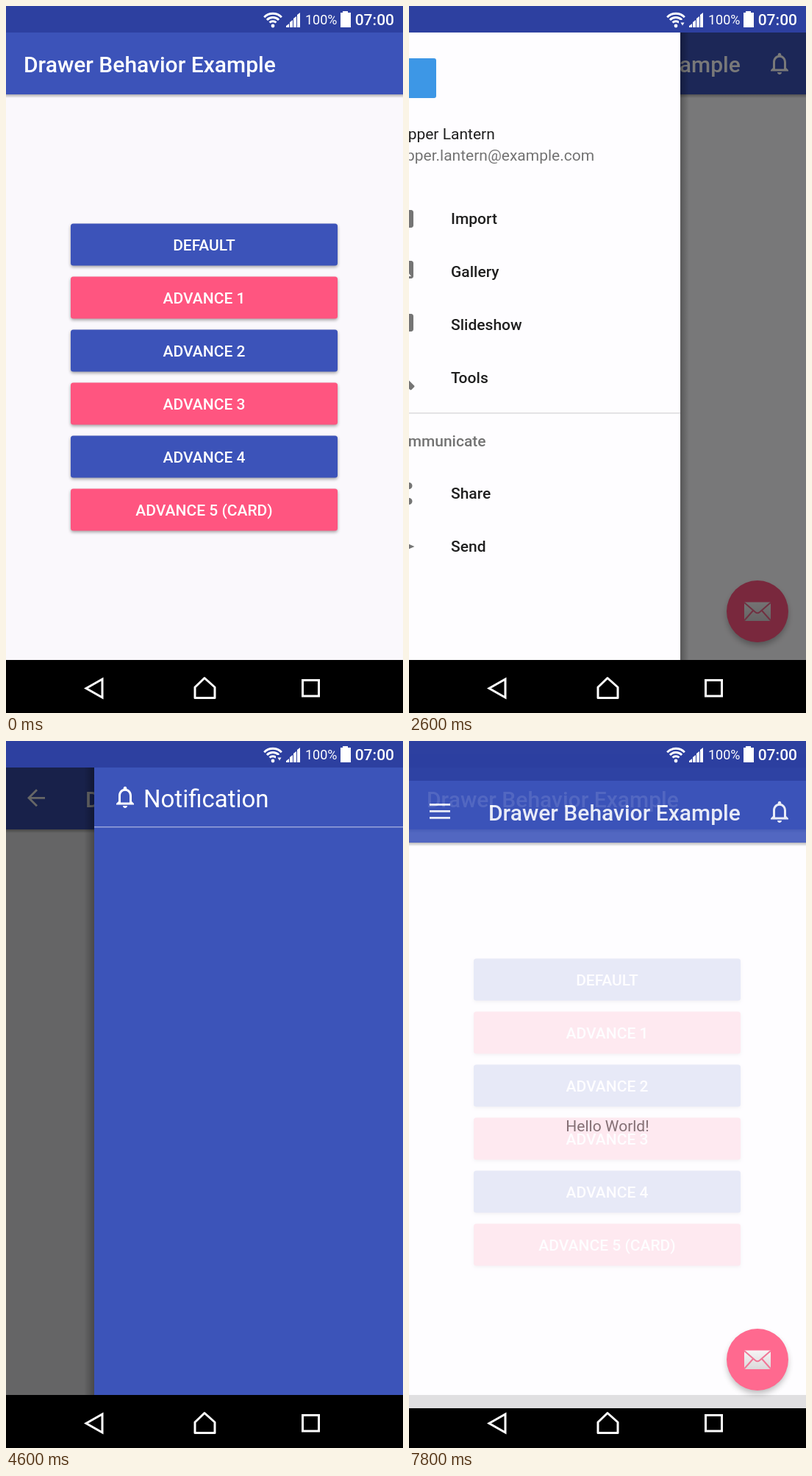
Recreate the animation shown at these times as an HTML page. Size 540x960 px, loop 8 s.

```html
<!DOCTYPE html>
<html lang="en">
<head>
<meta charset="utf-8">
<title>Drawer Behavior Example</title>
<style>
  html, body { margin: 0; width: 100%; height: 100%; overflow: hidden; background: #000; }
  svg { display: block; width: 100vw; height: 100vh; font-family: Roboto, "Noto Sans", sans-serif; font-size: 21px; }
  .medium { font-weight: 500; }
  .title { font-size: 30px; font-weight: 500; fill: #fff; }
  .mid { text-anchor: middle; }
  .gray { fill: #737373; }
  .line { fill: none; stroke: #fff; stroke-width: 3; }
</style>
</head>
<body>
<svg viewBox="0 0 540 960" xmlns="http://www.w3.org/2000/svg">
  <defs>
    <linearGradient id="under" x2="0" y2="1">
      <stop offset="0" stop-opacity=".3"/><stop offset="1" stop-opacity="0"/>
    </linearGradient>
    <linearGradient id="edge">
      <stop offset="0" stop-opacity=".28"/><stop offset="1" stop-opacity="0"/>
    </linearGradient>
    <linearGradient id="paper" x2="0" y2="1">
      <stop offset="0" stop-color="#f6f4f5"/><stop offset="1" stop-color="#d6d4d5"/>
    </linearGradient>
    <filter id="blur" x="-20%" y="-40%" width="140%" height="180%"><feGaussianBlur stdDeviation="2"/></filter>
    <filter id="soft" x="-30%" y="-40%" width="160%" height="180%"><feGaussianBlur stdDeviation="4"/></filter>
    <path id="bell" transform="scale(1.5)" fill="#fff" d="M12 22c1.1 0 2-.9 2-2h-4c0 1.1.9 2 2 2zm6-6v-5c0-3.07-1.63-5.64-4.5-6.32V4c0-.83-.67-1.5-1.5-1.5s-1.5.67-1.5 1.5v.68C7.64 5.36 6 7.92 6 11v5l-2 2v1h16v-1l-2-2zm-2 1H8v-6c0-2.48 1.51-4.5 4-4.5s4 2.02 4 4.5v6z"/>
    <g id="bars">
      <rect y="120" width="540" height="5" fill="url(#under)"/>
      <rect width="540" height="37" fill="#2d40a0"/>
      <rect y="36" width="540" height="84" fill="#3c53b9"/>
      <rect y="888" width="540" height="72"/>
    </g>
  </defs>

  <g id="menu">
    <rect width="540" height="960" fill="#faf8fc"/>
    <use href="#bars"/>
    <text class="title" x="24" y="90">Drawer Behavior Example</text>
    <g id="buttons"></g>
  </g>

  <g id="page">
    <rect width="540" height="960" fill="#fefdff"/>
    <use href="#bars"/>
    <path id="toggle" class="line" style="stroke-width:2.8"/>
    <text class="title" x="108" y="90">Drawer Behavior Example</text>
    <use href="#bell" x="0" y="0" transform="translate(486 60)"/>
    <text class="mid gray" x="270" y="512">Hello World!</text>
    <circle cx="474" cy="827" r="41" opacity=".3" filter="url(#soft)"/>
    <circle cx="474" cy="822" r="42" fill="#ff5580"/>
    <rect x="456" y="809.5" width="36" height="25.5" rx="1" fill="url(#paper)"/>
    <path d="M456 810L471 823Q474 825.5 477 823L492 810M456 834.5L468 821M492 834.5L480 821" fill="none" stroke="#f0658a" stroke-width="2"/>
    <rect id="scrim" y="36" width="540" height="852"/>

    <g id="left">
      <rect x="420" y="36" width="12" height="852" fill="url(#edge)"/>
      <rect y="36" width="420" height="852" fill="#fefdff"/>
      <rect x="34" y="71" width="54" height="54" rx="3" fill="#3d97e6"/>
      <text x="24" y="181" fill="#1f1f1f">Copper Lantern</text>
      <text x="24" y="210" class="gray">copper.lantern@example.com</text>
      <g id="items"></g>
      <rect y="552" width="420" height="1.5" fill="#dcdbdd"/>
      <text x="24" y="598" class="medium gray">Communicate</text>
    </g>

    <g id="right">
      <rect x="-14" y="36" width="14" height="852" fill="url(#edge)" transform="matrix(-1 0 0 1 -14 0)"/>
      <rect y="36" width="420" height="852" fill="#3c54b9"/>
      <use href="#bell" transform="translate(24 58)"/>
      <text x="67" y="90" font-size="33" fill="#fff">Notification</text>
      <rect y="116" width="420" height="1.5" fill="#98a4da"/>
    </g>
    <rect y="888" width="540" height="72"/>
  </g>

  <g id="system" fill="#fff">
    <g class="line" id="wifi"></g>
    <circle cx="363" cy="27" r="2.4"/>
    <path id="traffic" d="M367 19h8v10h-8z" fill="#2d40a0"/>
    <path id="arrow" d="M369.5 22.5h5l-2.5 4z"/>
    <g id="signal"></g>
    <text x="407" y="25" font-size="18">100%</text>
    <path d="M458 7h7v2h4v20h-14V9h3z"/>
    <text class="medium" x="528" y="26" text-anchor="end">07:00</text>
    <rect id="ripple" x="41" y="888" width="158" height="72" rx="36" fill="#2a2a2c"/>
    <g class="line">
      <path d="M109 926.5L131 914V939z"/>
      <path d="M270 912.5L284 925V939.5H257V925z" stroke-linejoin="round"/>
      <rect x="403.5" y="915.5" width="22" height="21.5"/>
    </g>
  </g>
</svg>

<script>
const LOOP = 8000, STEP = 200, WIDTH = 420;
const $ = id => document.getElementById(id);
const lerp = (a, b, k) => a + (b - a) * k;

// Static repeats
const labels = ["DEFAULT", "ADVANCE 1", "ADVANCE 2", "ADVANCE 3", "ADVANCE 4", "ADVANCE 5 (CARD)"];
const plate = (y, extra) => `<rect x="88" y="${y}" width="363" height="57" rx="3.5" ${extra}/>`;
$("buttons").innerHTML = labels.map((label, i) => {
  const y = 295.5 + 72 * i;
  const lift = i ? "" : `<g class="press">${plate(y + 3, 'opacity=".45" filter="url(#soft)"')}</g>`;
  const dim = i ? "" : `<g class="press">${plate(y, 'opacity=".09"')}</g>`;
  return lift + plate(y + 2, 'opacity=".35" filter="url(#blur)"') +
    plate(y, `fill="${i % 2 ? "#ff5580" : "#3c53b9"}"`) +
    `<text class="mid medium" x="269.5" y="${y + 36.5}" fill="#fff">${label}</text>` + dim;
}).join("");

const frame = "M20 2H8c-1.1 0-2 .9-2 2v12c0 1.1.9 2 2 2h12c1.1 0 2-.9 2-2V4c0-1.1-.9-2-2-2z";
const stack = "M2 6v14c0 1.1.9 2 2 2h14v-2H4V6z";
const dot = (x, y, r) => `M${x - r} ${y}a${r} ${r} 0 1 0 ${2 * r} 0a${r} ${r} 0 1 0 ${-2 * r} 0z`;
const items = [
  ["Import", 289, "M9 2L7.17 4H4c-1.1 0-2 .9-2 2v12c0 1.1.9 2 2 2h16c1.1 0 2-.9 2-2V6c0-1.1-.9-2-2-2h-3.17L15 2z" + dot(12, 12, 5) + dot(12, 12, 3.2)],
  ["Gallery", 361, frame + "M11 12l2.03 2.71L16 11l4 5H8z" + stack],
  ["Slideshow", 433, frame + "M12 14.5v-9l6 4.5z" + stack],
  ["Tools", 505, "M22.7 19l-9.1-9.1c.9-2.3.4-5-1.5-6.9-2-2-5-2.4-7.4-1.3L9 6 6 9 1.6 4.7C.4 7.1.9 10.1 2.9 12.1c1.9 1.9 4.6 2.4 6.9 1.5l9.1 9.1c.4.4 1 .4 1.4 0l2.3-2.3c.5-.4.5-1.1.1-1.4z"],
  ["Share", 662, dot(18, 5, 3) + dot(6, 12, 3) + dot(18, 19, 3), "M18 5L6 12l12 7"],
  ["Send", 734, "M2 21L23 12 2 3v7l15 2-15 2z"]
];
$("items").innerHTML = items.map(([name, y, shape, link = ""]) =>
  `<g transform="translate(24 ${y - 18}) scale(1.5)" fill="#757575">
     <path d="${shape}" fill-rule="evenodd"/>
     <path d="${link}" fill="none" stroke="#757575" stroke-width="2"/></g>
   <text class="medium" x="108" y="${y + 7}" fill="#1f1f1f">${name}</text>`).join("");

$("wifi").innerHTML = [6.3, 11.4, 16.7].map(r => {
  const d = r * Math.SQRT1_2;
  return `<path d="M${363 - d} ${27 - d}A${r} ${r} 0 0 1 ${363 + d} ${27 - d}"/>`;
}).join("");
$("signal").innerHTML = [0, 1, 2, 3].map(i => {
  const x = 381 + 5 * i, top = 25 - 5 * i;
  return `<path d="M${x} ${top + 2}L${x + 4} ${top - 1}V29H${x}z"/>`;
}).join("");

// Quintic settle of a drawer: 0 closed, 1 open
function settle(t, open, close) {
  const left = start => (1 - Math.min(1, Math.max(0, (t - start) / 500))) ** 5;
  return t < close ? 1 - left(open) : left(close);
}

// Menu bars that turn into an arrow
function togglePath(p) {
  const len = lerp(28, 17, p), shaft = lerp(28, 24, p), turn = p * Math.PI / 4;
  const dx = len * Math.cos(turn), dy = len * Math.sin(turn);
  const gap = lerp(9, -1, p), x = -shaft / 2;
  return `M${x + p} 0h${shaft - 2 * p}M${x} ${gap}l${dx} ${dy}M${x} ${-gap}l${dx} ${-dy}`;
}

const show = (el, on) => el.setAttribute("visibility", on ? "visible" : "hidden");
const move = (el, x, y) => el.setAttribute("transform", `translate(${x} ${y})`);

function draw(now) {
  const t = Math.floor(now % LOOP / STEP) * STEP;
  const during = (a, b) => t >= a && t < b;

  const entering = during(1600, 1800), leaving = t >= 7800;
  show($("page"), t >= 1600);
  $("page").setAttribute("opacity", entering ? .82 : leaving ? .886 : 1);
  move($("page"), 0, entering || leaving ? 18 : 0);

  const visible = (open, close) => Math.round(settle(t, open, close) * WIDTH);
  const left = visible(2428, 3400), right = visible(4146, 5546);
  move($("left"), left - WIDTH - (left ? 0 : 20), 0);
  move($("right"), 540 - right + (right ? 0 : 20), 0);

  const p = Math.max(left, right) / WIDTH;
  const closing = during(3400, 4000) || during(5546, 6200);
  $("scrim").setAttribute("opacity", .6 * p);
  $("toggle").setAttribute("d", togglePath(p));
  $("toggle").setAttribute("transform", `translate(42 77.3) rotate(${180 * (p - 1) * (closing ? -1 : 1)})`);

  document.querySelectorAll(".press").forEach(el => show(el, during(1400, 1800)));
  const busy = during(2000, 6800);
  show($("traffic"), busy);
  show($("arrow"), busy);
  show($("ripple"), during(6600, 6800));
}

const start = performance.now();
function tick() {
  draw(performance.now() - start);
  requestAnimationFrame(tick);
}
tick();
</script>
</body>
</html>
```
